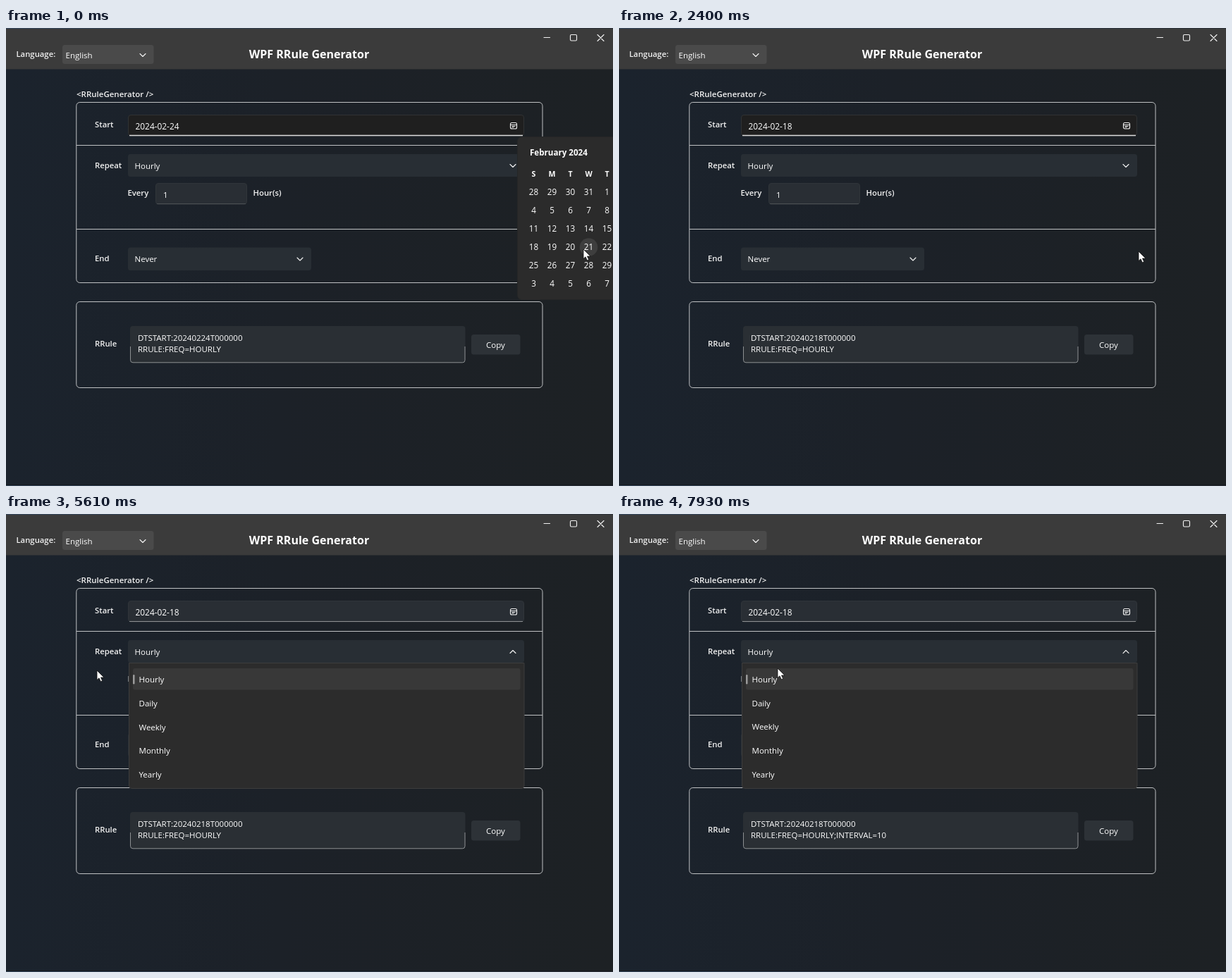
Animation, 861 px wide and 650 px high, one loop 8 s. Source, as an HTML page:

```html
<!DOCTYPE html>
<html lang="en">
<head>
<meta charset="utf-8">
<title>WPF RRule Generator</title>
<style>
  html, body { margin: 0; width: 100%; height: 100%; overflow: hidden; background: #1c2127; }
  svg { display: block; width: 861px; height: 650px; }
  text { font: 500 11.5px "Open Sans", "Noto Sans", sans-serif; fill: #fff; white-space: pre; }
  .label { font-size: 11.3px; font-weight: 600; fill: #f2f2f2; }
  .name { font-size: 11.5px; }
  .date { font-size: 11.9px; }
  .title { font-size: 16px; font-weight: 700; }
  .mid { text-anchor: middle; }
  .month { font-size: 11.6px; font-weight: 700; }
  .head { font-size: 10.6px; font-weight: 700; }
  .day { font-size: 11.7px; }
  .frame { fill: none; stroke: #bfc1c3; }
  .combo { fill: #282e34; }
  .icon { fill: none; stroke: #f0f0f0; stroke-width: 1.15; stroke-linecap: round; stroke-linejoin: round; }
  .box { fill: #292e34; stroke: #30353a; }
  .line { fill: none; stroke: #8d9092; }
  .focus .box { fill: #1f1f1f; stroke: #303234; }
  .focus .line { stroke: #dcdcdc; stroke-width: 1.5; }
  #every:not(.focus) .line { stroke: #4b5054; }
</style>
</head>
<body>
<svg viewBox="0 0 861 650">
  <defs>
    <linearGradient id="back">
      <stop offset="0" stop-color="#1b232d"/>
      <stop offset=".45" stop-color="#1c2128"/>
      <stop offset="1" stop-color="#1d2124"/>
    </linearGradient>
    <linearGradient id="edge">
      <stop offset="0" stop-color="#35485e"/>
      <stop offset="1" stop-color="#2a2f37"/>
    </linearGradient>
    <path id="chev" class="icon" d="M-4-2 0 2 4-2"/>
  </defs>

  <rect width="861" height="650" fill="url(#back)"/>
  <rect width="861" height="58.5" fill="#3b3b3b"/>
  <rect width="861" height="1" fill="url(#edge)"/>
  <rect y="648" width="861" height="1" fill="#14181d"/>
  <rect y="649" width="861" height="1" fill="url(#edge)"/>

  <text class="label" x="14.5" y="41">Language:</text>
  <rect x="80" y="24" width="129.5" height="27" rx="3.5" fill="#4a4a4a"/>
  <text x="84.5" y="42.5">English</text>
  <use href="#chev" x="194" y="38.5"/>
  <text class="title mid" x="430" y="43">WPF RRule Generator</text>
  <path class="icon" d="M763 13.5h8.5M839 9.5l9 9m0-9-9 9"/>
  <rect class="icon" x="800.5" y="9.500" width="9" height="8.500" rx="1.500"/>

  <text class="label name" x="100" y="97.5">&lt;RRuleGenerator /&gt;</text>
  <rect class="frame" x="99.8" y="105.5" width="661.2" height="256" rx="5"/>
  <path class="frame" d="M100 166.5h661M100 285.5h661"/>
  <rect class="frame" x="99.8" y="388.5" width="661.2" height="122" rx="5"/>

  <text class="label" x="126" y="141">Start</text>
  <g id="start">
    <rect class="box" x="173.5" y="123.5" width="561" height="29.5" rx="3.5"/>
    <path class="line" d="M175 152.5h558"/>
    <text class="date" id="date" x="183.5" y="144"></text>
    <rect class="icon" x="715.5" y="134.5" width="9" height="8.5" rx="2"/>
    <path class="icon" d="M716 137.5h8.500M718 139.500h4M718 141h2"/>
  </g>

  <text class="label" x="126" y="198.5">Repeat</text>
  <rect class="combo" x="173" y="179" width="562" height="32" rx="3.5"/>
  <text x="182.5" y="200">Hourly</text>
  <use href="#chev" id="flip"/>

  <text class="label" x="172.5" y="238">Every</text>
  <g id="every">
    <rect class="box" x="212.5" y="220.5" width="129" height="29.5" rx="3.5"/>
    <path class="line" d="M214 249.5h126"/>
    <text id="count" x="223" y="241"></text>
    <path id="caret" d="M0 228.5v15" stroke="#fff"/>
  </g>
  <text class="label" x="350.5" y="238">Hour(s)</text>

  <text class="label" x="126" y="331">End</text>
  <rect class="combo" x="173" y="311.5" width="260" height="32.5" rx="3.5"/>
  <text x="182.5" y="332">Never</text>
  <use href="#chev" x="417" y="328"/>

  <text class="label" x="126" y="452">RRule</text>
  <rect x="176" y="423" width="475.5" height="52" rx="4" fill="#2a2f34"/>
  <path class="line" d="M176.500 452v19.300q0 3.500 3.500 3.500h467.500q3.500 0 3.500-3.500v-19.300"/>
  <text id="from" x="187" y="444"></text>
  <text id="rule" x="187" y="460"></text>
  <rect x="660" y="435" width="69.5" height="28.5" rx="3.5" fill="#2d3237"/>
  <text class="mid" x="694.5" y="454">Copy</text>

  <g id="menu">
    <path d="M174.5 211.5h560.5v174q0 4-4 4h-552.5q-4 0-4-4z" fill="#2c2c2c" stroke="#3d3d3d"/>
    <rect x="180" y="219" width="549.5" height="30.5" rx="3" fill="#383838"/>
    <rect x="180" y="228" width="2.5" height="13.5" rx="1.2" fill="#9b9b9b"/>
  </g>

  <g id="cal">
    <rect x="-.5" y="-.5" width="190" height="231" rx="6" fill="#2b2b2b" stroke="#252627"/>
    <circle id="hover" r="12.8" fill="#3e3e3e"/>
    <circle id="ring" r="12.5" fill="none" stroke="#919191"/>
    <text class="month" x="17" y="26">February 2024</text>
    <path d="M140 25l5-6 5 6z" fill="#fff"/>
  </g>

  <circle id="click" r="10.5" fill="#ffee00" opacity=".6"/>
  <path id="arrow" d="M0 0v13.5l3-2.7 2.3 5 2.4-1.1-2.2-4.7h4.5z" fill="#fff" stroke="#111" stroke-width=".8"/>
  <path id="beam" d="M-3.5-6.5h2.5l1 1 1-1h2.5M0-5.5v11M-3.5 6.5h2.5l1-1 1 1h2.5" fill="none" stroke="#e6e6e6"/>
</svg>

<script>
const LOOP = 8000;
const el = {};
document.querySelectorAll('[id]').forEach(e => el[e.id] = e);

const addText = (parent, cls, x, y, str) => {
  const e = document.createElementNS('http://www.w3.org/2000/svg', 'text');
  e.setAttribute('class', cls);
  e.setAttribute('x', x);
  e.setAttribute('y', y);
  e.textContent = str;
  parent.append(e);
};

// calendar grid: cells of 26 px, first one centred at CX, CY
const CELL = 26, CX = 22.5, CY = 78, COLS = 5;
for (let c = 0; c < COLS; c++) {
  addText(el.cal, 'head mid', CX + c * CELL, 56, 'SMTWT'[c]);
  for (let r = 0; r < 6; r++) {
    const n = r * 7 + c - 3;
    const day = n < 1 ? n + 31 : n > 29 ? n - 29 : n;
    addText(el.cal, 'day mid', CX + c * CELL, CY + r * CELL + 4.3, day);
  }
}
['Hourly', 'Daily', 'Weekly', 'Monthly', 'Yearly'].forEach((s, i) =>
  addText(el.menu, '', 188.5, 239 + i * 33.75, s));

// pointer stops: time, x, y
const path = [
  [0, 819, 314], [400, 819, 314], [800, 723, 130], [920, 718, 143],
  [1180, 718, 143], [1340, 783, 208], [1520, 770, 285], [1680, 748, 326], [1800, 742, 319],
  [2160, 742, 319], [2400, 737, 317], [2700, 737, 317], [3520, 343, 268],
  [3580, 343, 268], [3960, 232, 192], [4390, 232, 192], [4690, 191, 358],
  [5190, 191, 358], [5570, 129, 222], [5730, 129, 222], [5970, 238, 240],
  [6040, 238, 240], [6050, 238, 241], [7380, 238, 236], [7410, 238, 236],
  [7610, 257, 211.5], [7800, 257, 211.5], [7930, 225, 219], [LOOP, 225, 219]
];
const clicks = [[200, 360], [920, 1040], [1960, 2080], [4010, 4130], [5650, 5730], [6410, 6570], [7610, 7810]];

const within = (t, a, b) => t >= a && t < b;
const show = (e, on) => e.style.display = on ? '' : 'none';
const put = (e, x, y, extra = '') => e.setAttribute('transform', `translate(${x} ${y})${extra}`);
const say = (e, s) => { if (e.textContent !== s) e.textContent = s; };

function pointer(t) {
  const i = path.findIndex(p => p[0] > t);
  const [t0, x0, y0] = path[i - 1], [t1, x1, y1] = path[i];
  const u = (t - t0) / (t1 - t0), k = u * u * (3 - 2 * u);
  return [x0 + (x1 - x0) * k, y0 + (y1 - y0) * k];
}

// 0 closed, 1 open; refreshed every 80 ms
const ease = (t, t0) => 1 - (1 - Math.min(1, Math.floor((t - t0) / 80) * 80 / 240)) ** 5;

function drawCalendar(t, x, y) {
  const first = t < 320;
  const open = first || within(t, 1040, 2120);
  show(el.cal, open);
  if (!open) return;
  const [ox, oy] = first ? [726, 155] : [719, 157.5];
  put(el.cal, ox, oy);
  const cell = (e, c, r) => put(e, CX + c * CELL, CY + r * CELL);
  const col = Math.round((x - ox - CX) / CELL), row = Math.round((y - oy - CY) / CELL);
  const over = within(col, 0, COLS) && within(row, 0, 6);
  show(el.hover, over);
  if (over) cell(el.hover, col, row);
  show(el.ring, t >= 280);
  cell(el.ring, t < 2040 ? 3 : 0, 3);
}

function draw(t) {
  const [x, y] = pointer(t);
  const day = t < 280 ? 24 : t < 2040 ? 21 : 18;
  const typed = t >= 6930;
  const editing = within(t, 6410, 7810);

  say(el.date, '2024-02-' + day);
  say(el.from, `DTSTART:202402${day}T000000`);
  say(el.rule, 'RRULE:FREQ=HOURLY' + (t >= 7010 ? ';INTERVAL=10' : ''));
  say(el.count, typed ? '10' : '1');
  el.start.classList.toggle('focus', t < 4090);
  el.every.classList.toggle('focus', editing);
  show(el.caret, editing && t < 7410);
  put(el.caret, typed ? 236.5 : 230, 0);

  drawCalendar(t, x, y);

  let p = 0;
  if (within(t, 4130, 5730)) p = ease(t, 4130);
  else if (within(t, 5730, 7770)) p = 1 - ease(t, 5730);
  else if (t >= 7770) p = ease(t, 7770);
  const open = p > 0 && !within(t, 5730, 7770);
  show(el.menu, open);
  put(el.menu, 0, -8 * (1 - p));
  put(el.flip, 719, 195.5, ` rotate(${180 * p})`);

  const inField = !open && within(x, 212, 342) && within(y, 220, 250);
  show(el.arrow, !inField);
  show(el.beam, inField && !within(t, 6930, 7410));
  put(el.arrow, x, y);
  put(el.beam, x, y);
  show(el.click, clicks.some(([a, b]) => within(t, a, b)));
  put(el.click, inField ? x - 1.5 : x, inField ? y - .5 : y);
}

function tick() {
  draw(performance.now() % LOOP);
  requestAnimationFrame(tick);
}
tick();
</script>
</body>
</html>
```
